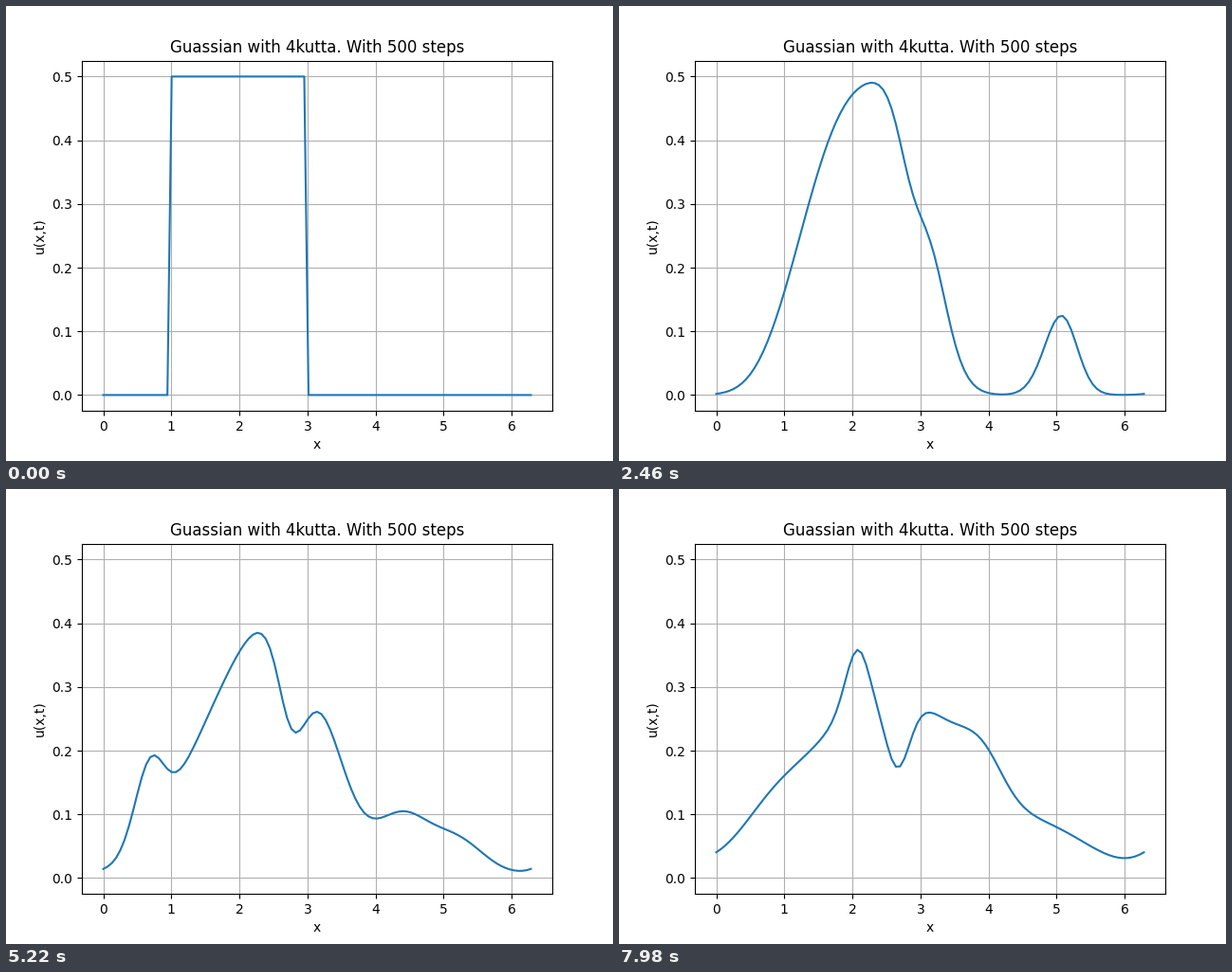
These frames come from a looping animation (640x480 px, 8000 ms). A matplotlib script:

```python
import numpy as np
import matplotlib.pyplot as plt
from matplotlib.animation import FuncAnimation

# Viscous Burgers equation on a periodic grid, stepped with RK4
CELLS = 100
STEPS = 500
FRAMES = 267
LOOP_MS = 8000
NU = 0.07
KICK_EVERY = 50
KICKS = [(80, 44), (68, 40), (10, 43), (60, 36), (32, 42)]  # (raised, lowered) cells

dx = 2 * np.pi / CELLS
dt = 2 * np.pi / STEPS
x = np.linspace(0, 2 * np.pi, CELLS + 1)


def slope(u):
    left, right = np.roll(u, 1), np.roll(u, -1)
    advection = u * (right - left) / (2 * dx)
    diffusion = NU * (right - 2 * u + left) / dx**2
    return diffusion - advection


def rk4(u):
    k1 = slope(u)
    k2 = slope(u + dt / 2 * k1)
    k3 = slope(u + dt / 2 * k2)
    k4 = slope(u + dt * k3)
    return u + dt / 6 * (k1 + 2 * k2 + 2 * k3 + k4)


def kick(u, up, down):
    """Move a three-cell block of height from one spot to another."""
    amount = 0.8 * u.max()
    u = u.copy()
    u[up - 1:up + 2] += amount
    u[down - 1:down + 2] -= amount
    return u


def solve():
    u = np.where((x[:-1] >= 1) & (x[:-1] <= 3), 0.5, 0.0)
    history = [u]
    for step in range(1, FRAMES):
        u = rk4(u)
        if step % KICK_EVERY == 0:
            u = kick(u, *KICKS[step // KICK_EVERY - 1])
        history.append(u)
    return [np.append(u, u[0]) for u in history]


waves = solve()

fig, ax = plt.subplots(figsize=(6.4, 4.8), dpi=100)
line, = ax.plot(x, waves[0], color="#1f77b4", lw=1.5)
ax.set_xlim(ax.get_xlim())
ax.set_ylim(ax.get_ylim())
ax.set_title("Guassian with 4kutta. With 500 steps")
ax.set_xlabel("x")
ax.set_ylabel("u(x,t)")
ax.grid(True)


def update(i):
    line.set_ydata(waves[i])
    return line,


anim = FuncAnimation(fig, update, frames=FRAMES, interval=LOOP_MS / FRAMES,
                     repeat=True, repeat_delay=0)
plt.show()
```
